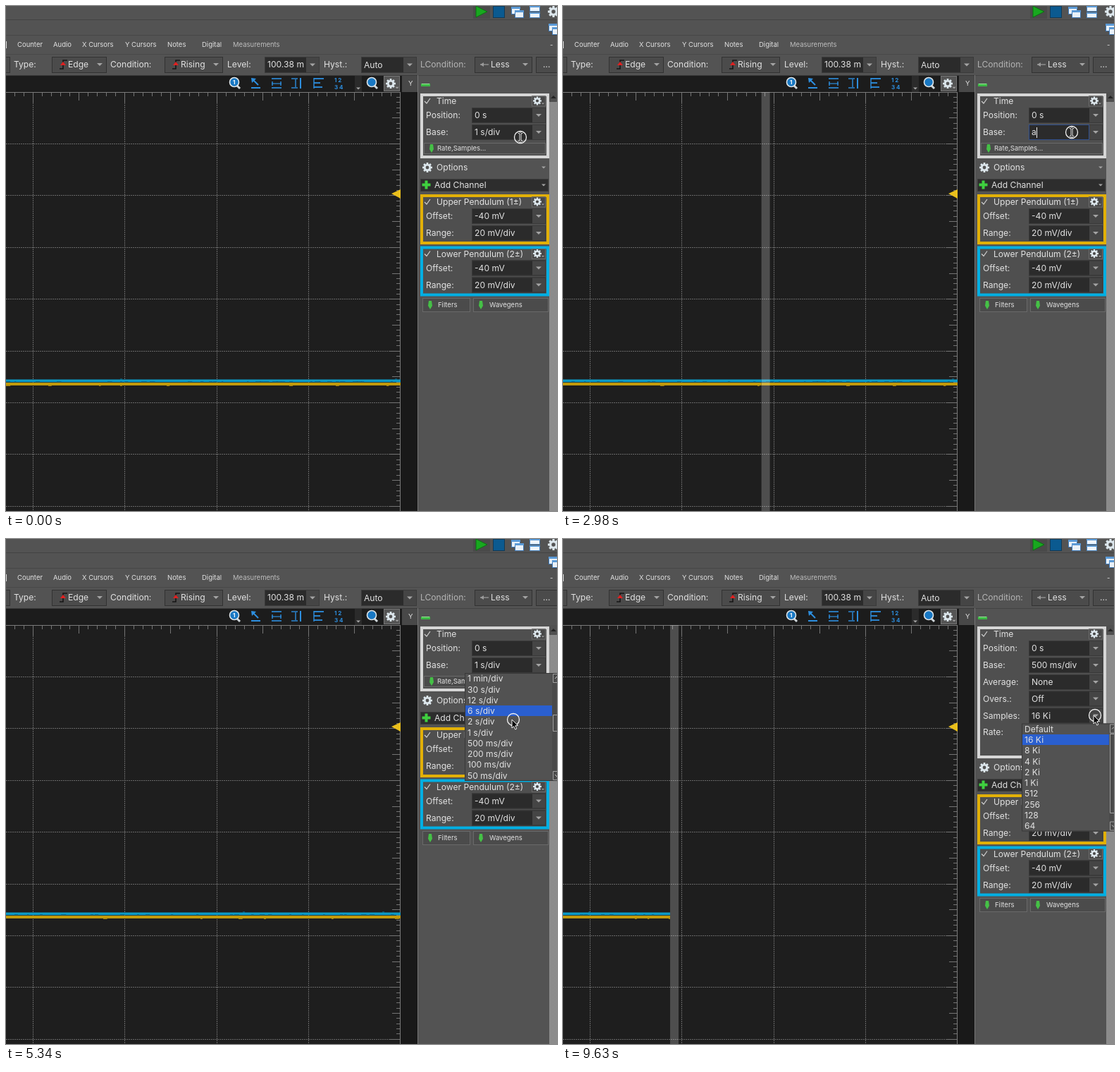
An HTML page with a canvas that plays this animation: 782 px wide and 716 px high, repeating every 9.65 s.

```html
<!DOCTYPE html>
<html lang="en">
<head>
<meta charset="utf-8">
<title>Oscilloscope time base</title>
<style>
  html, body { margin: 0; width: 100%; height: 100%; overflow: hidden; background: #535353; }
  canvas { display: block; }
</style>
</head>
<body>
<canvas id="stage" width="782" height="716"></canvas>
<script>
const ctx = document.getElementById('stage').getContext('2d');
const LOOP = 9650;
const BODY = 12.1, SMALL = 9.5;
const PLOT = { right: 559, top: 122, bottom: 716, gridX: 38, divX: 130.3, gridY: 195, divY: 73.4 };
const CHANNELS = [['Upper Pendulum (1±)', '#e2b007', 267], ['Lower Pendulum (2±)', '#00afe3', 340.5]];
const BASE_ITEMS = ['1 min/div', '30 s/div', '12 s/div', '6 s/div', '2 s/div', '1 s/div',
  '500 ms/div', '200 ms/div', '100 ms/div', '50 ms/div'];
const SAMPLE_ITEMS = ['Default', '16 Ki', '8 Ki', '4 Ki', '2 Ki', '1 Ki', '512', '256', '128', '64'];

// Moments of the interaction, in ms
const FOCUS = 420, ERASE = 2000, TYPE = 2700, UNTYPE = 3450, OPEN_BASE = 4300,
  PICK = 6220, EXPAND = 7030, OPEN_SAMPLES = 9560;

// Pointer stops: time, x, y
const PATH = [
  [0, 730, 186], [60, 730, 186], [240, 727, 181], [590, 727, 181], [1020, 756, 181], [1260, 756, 181],
  [1520, 722, 179], [3570, 722, 179], [4150, 755, 181], [4650, 755, 181], [5200, 722, 240],
  [5340, 720, 256], [5450, 720, 264], [5510, 720, 264], [5780, 717, 290], [6220, 717, 290],
  [6850, 671, 200], [7440, 671, 200], [7950, 717, 265], [8250, 709, 256], [8430, 709, 256],
  [9350, 749, 251], [9450, 755, 250], [LOOP, 755, 250]
];

const between = (t, a, b) => t >= a && t < b;

function rect(x, y, w, h, fill, stroke) {
  ctx.fillStyle = fill;
  ctx.fillRect(x, y, w, h);
  if (stroke) {
    ctx.strokeStyle = stroke;
    ctx.lineWidth = 1;
    ctx.strokeRect(x + .5, y + .5, w - 1, h - 1);
  }
}

function text(str, x, y, size = BODY, fill = '#e2e2e2', weight = 400) {
  ctx.font = `${weight} ${size}px Inter, "Open Sans", sans-serif`;
  ctx.textBaseline = 'alphabetic';
  ctx.fillStyle = fill;
  ctx.fillText(str, x, y + size * .36);
}

function poly(points, fill, stroke, width = 1) {
  ctx.beginPath();
  points.forEach(([x, y]) => ctx.lineTo(x, y));
  ctx.closePath();
  if (fill) { ctx.fillStyle = fill; ctx.fill(); }
  if (stroke) { ctx.strokeStyle = stroke; ctx.lineWidth = width; ctx.stroke(); }
}

function line(points, color, width = 1) {
  ctx.beginPath();
  points.forEach(([x, y]) => ctx.lineTo(x, y));
  ctx.strokeStyle = color;
  ctx.lineWidth = width;
  ctx.stroke();
}

function ring(x, y, r, color, width) {
  ctx.beginPath();
  ctx.arc(x, y, r, 0, Math.PI * 2);
  ctx.strokeStyle = color;
  ctx.lineWidth = width;
  ctx.stroke();
}

const caretDown = (x, y, s = 4, fill = '#a4a4a4') =>
  poly([[x - s, y - s / 2], [x + s, y - s / 2], [x, y + s / 2]], fill);

const check = (x, y) => line([[x - 4, y], [x - 1, y + 3], [x + 4, y - 4]], '#d0d0d0', 1.2);

function gear(x, y, r, color = '#dce6ec') {
  for (let i = 0; i < 8; i++) {
    const a = i * Math.PI / 4;
    line([[x + Math.cos(a) * r * .6, y + Math.sin(a) * r * .6],
      [x + Math.cos(a) * r, y + Math.sin(a) * r]], color, r * .38);
  }
  ring(x, y, r * .55, color, r * .42);
}

function gearButton(x, y) {
  rect(x, y, 20, 15, '#484848', '#6a6a6a');
  gear(x + 8, y + 7, 6);
  caretDown(x + 16, y + 11, 2);
}

function greenArrow(x, y, up) {
  const d = up ? -1 : 1;
  poly([[x - 2, y - 6 * d], [x + 2, y - 6 * d], [x + 3, y + 1 * d], [x, y + 6 * d], [x - 3, y + 1 * d]],
    up ? '#4fd04f' : '#45c046');
}

function field(x, y, w, h, value, focused) {
  rect(x, y, w, h, '#2b2b2b', '#3a3a3a');
  rect(x + w - 19, y + 1, 18, h - 2, '#454545');
  caretDown(x + w - 10, y + h / 2);
  if (focused) {
    ctx.strokeStyle = '#31508f';
    ctx.strokeRect(x + .5, y + .5, w - 20, h - 1);
  }
  text(value, x + 4, y + h / 2);
}

function combo(x, w, label) {
  rect(x, 72, w, 23, '#4b4b4b', '#323232');
  text(label, x + 23, 83);
  caretDown(x + w - 10, 83);
}

function edgeIcon(x) {
  line([[x, 89], [x + 5, 89], [x + 5, 77], [x + 11, 77]], '#161616', 1.6);
  poly([[x + 1, 84], [x + 9, 84], [x + 5, 79]], '#e02020');
}

function drawWindows(x, y) {
  for (const d of [0, 5]) {
    rect(x + d, y + d, 13, 11, '#e9f1f8', '#3f78b5');
    rect(x + d, y + d, 13, 3, '#5b9ad6');
  }
}

function drawTopBars() {
  rect(0, 0, 782, 98, '#535353');
  rect(0, 19, 782, 1, '#434343');
  rect(0, 41, 782, 1, '#474747');
  rect(663, 0, 24, 18, '#4a4a4a');
  poly([[667, 0], [683, 8], [667, 16]], '#18a81f', '#0b6f12');
  rect(691, 0, 17, 17, '#0b5a90', '#123a56');
  drawWindows(717, 1);
  for (const y of [0, 9]) {
    rect(743, y, 15, 8, '#eef4f9', '#4b84bd');
    rect(743, y, 15, 2, '#5b9ad6');
  }
  gear(777, 8, 8);
  drawWindows(770, 25);

  rect(0, 50, 1, 10, '#dadada');
  [['Counter', 16], ['Audio', 67], ['X Cursors', 108], ['Y Cursors', 169], ['Notes', 229], ['Digital', 278]]
    .forEach(([label, x]) => text(label, x, 55, SMALL));
  text('Measurements', 322, 55, SMALL, '#bdbdbd');
  text('-', 772, 55, SMALL);

  rect(0, 68, 782, 1, '#484848');
  rect(-8, 72, 14, 23, '#4b4b4b', '#323232');
  text('Type:', 11, 83);
  combo(65, 78, 'Edge');
  edgeIcon(76);
  text('Condition:', 148, 83);
  combo(225, 83, 'Rising');
  edgeIcon(236);
  text('Level:', 314, 83);
  field(367, 72, 78, 23, '');
  text('100.38 m', 371, 83);
  text('Hyst.:', 451, 83);
  field(504, 72, 79, 23, 'Auto');
  text('LCondition:', 588, 83, BODY, '#b4b4b4');
  combo(665, 82, 'Less');
  line([[673, 83], [685, 83]], '#9a9a9a', 1.3);
  poly([[673, 83], [678, 80], [678, 86]], '#9a9a9a');
  rect(752, 72, 32, 23, '#4b4b4b', '#323232');
  text('...', 762, 83);
}

function magnifier(x) {
  line([[x + 4, 113], [x + 8, 117]], '#cfd6da', 3);
  ctx.beginPath();
  ctx.arc(x, 108, 6, 0, 7);
  ctx.fillStyle = '#1878c4';
  ctx.fill();
  ring(x, 108, 6.5, '#dfe8ee', 1.6);
}

function drawPlotTools() {
  const blue = '#2d8fe0';
  rect(0, 98, 584, 24, '#1c1c1c');
  rect(0, 98, 584, 1, '#3a3a3a');
  magnifier(324);
  text('1', 322, 108, 8, '#fff', 700);
  line([[351, 105], [358, 112]], blue, 2);
  poly([[348, 102], [355, 103], [349, 109]], blue);
  line([[348, 116], [361, 116]], blue, 2);
  for (const y of [103, 116]) line([[377, y], [391, y]], blue, 1.6);
  line([[377, 110], [391, 110]], blue, 1.2);
  for (const x of [378, 390]) line([[x, 107], [x, 113]], blue, 1.4);
  for (const y of [103, 116]) line([[405, y], [414, y]], blue, 1.4);
  line([[411, 104], [411, 115]], blue, 1.4);
  line([[418, 102], [418, 117]], blue, 2);
  [[103, 14], [109, 9], [115, 12]].forEach(([y, w]) => line([[437, y], [437 + w, y]], blue, 1.8));
  line([[437, 102], [437, 117]], blue, 1.4);
  text('1 2', 466, 105, 8, blue, 700);
  text('3 4', 466, 115, 8, blue, 700);
  rect(495, 99, 10, 23, '#2b2b2b');
  caretDown(500, 117, 3);
  magnifier(519);
  rect(536, 99, 23, 22, '#555', '#777');
  gear(546, 110, 7);
  caretDown(555, 116, 2.5);
  rect(562, 99, 23, 23, '#484848');
  text('Y', 571, 110, SMALL);
}

function drawGrid() {
  const { right, top, bottom, gridX, divX, gridY, divY } = PLOT;
  rect(0, top, 584, bottom - top, '#191919');
  rect(0, top, right, bottom - top, '#1e1e1e');
  ctx.setLineDash([2, 1]);
  for (let x = gridX; x < right - 5; x += divX)
    line([[Math.round(x) + .5, top], [Math.round(x) + .5, bottom]], '#686868');
  for (let y = gridY; y < bottom; y += divY)
    line([[0, Math.round(y) + .5], [right, Math.round(y) + .5]], '#686868');
  ctx.setLineDash([]);
  const tick = i => i % 5 ? 5 : i % 10 ? 11 : 14;
  for (let i = -2; i < 41; i++) {
    const x = Math.round(gridX + i * divX / 10) + .5;
    line([[x, top + 1], [x, top + 1 + tick(i)]], '#747474');
  }
  for (let i = -9; i < 71; i++) {
    const y = Math.round(gridY + i * divY / 10) + .5;
    line([[right, y], [right - tick(i), y]], '#747474');
  }
  line([[0, top + .5], [right, top + .5]], '#7a7a7a');
  line([[right + .5, top], [right + .5, bottom]], '#7a7a7a');
}

const noise = n => { const s = Math.sin(n * 12.9898) * 43758.5453; return s - Math.floor(s); };

function drawTrace(from, to, seed) {
  if (to <= from) return;
  ctx.save();
  ctx.beginPath();
  ctx.rect(from, 520, to - from, 25);
  ctx.clip();
  rect(0, 529.5, 560, 3.8, '#0a9ac6');
  rect(0, 534, 560, 4, '#c29a0b');
  for (let i = 0; i < 94; i++) {
    const n = i + seed * 131, x = i * 6, len = 2 + noise(n + .3) * 6;
    if (noise(n) < .3) rect(x, 532.5, len, 1, '#14566a');
    if (noise(n + .7) < .1) rect(x, 538, len, 1, '#9a7b10');
    if (noise(n + .5) < .03) rect(x, 528.5, 3, 1, '#0a7fa3');
  }
  ctx.restore();
}

function drawSignal(t) {
  const fresh = t >= PICK;
  const head = fresh ? (t - 9070) * .271 : (t - 915) * .1363;
  const end = Math.max(0, Math.min(560, head));
  drawTrace(0, end, fresh ? 2 : 1);
  if (!fresh) drawTrace(end, 560, 0);
  const left = Math.max(0, head), right = Math.min(560, head + 12);
  if (right > left) rect(left, PLOT.top, right - left, PLOT.bottom - PLOT.top, 'rgba(255,255,255,.21)');
  poly([[547, 266], [560, 260], [560, 273]], '#e9bf1c');
}

function group(y, h, color, title) {
  rect(588, y, 183, h, color);
  rect(592, y + 4, 175, h - 8, '#4f4f4f');
  check(598, y + 11);
  text(title, 611, y + 11);
  gearButton(746, y + 3.5);
}

function row(label, value, y, focused) {
  text(label, 596, y);
  field(661, y - 11, 105, 22, value, focused);
}

function button(label, x, y, w, h) {
  rect(x, y, w, h, '#4b4b4b', '#6a6a6a');
  greenArrow(x + 11, y + h / 2);
}

function baseValue(t) {
  if (t >= PICK) return '500 ms/div';
  if (t < ERASE || t >= OPEN_BASE) return '1 s/div';
  if (between(t, TYPE, UNTYPE)) return 'a';
  return '1 s/div'.slice(0, Math.max(0, 6 - Math.floor((t - ERASE) / 75)));
}

function drawBase(t) {
  const value = baseValue(t);
  row('Base:', value, 179, between(t, FOCUS, OPEN_BASE) || between(t, PICK, EXPAND));
  const blinkOn = (t + 1400) % 1050 < 525;
  if (between(t, 590, OPEN_BASE) && (blinkOn || between(t, ERASE, 2500)))
    rect(Math.round(665 + ctx.measureText(value).width), 172, 1, 15, '#f0f0f0');
}

function drawScrollbar() {
  rect(771, 122, 11, 594, '#6d6d6d');
  ctx.fillStyle = '#aaa';
  for (let y = 136; y < 716; y++)
    for (let x = 771 + y % 2; x < 782; x += 2) ctx.fillRect(x, y, 1, 1);
  rect(771, 122, 11, 14, '#505050');
  poly([[773, 131], [781, 131], [777, 127]], '#242424');
}

function drawPanel(t) {
  const open = t >= EXPAND, dy = open ? 95 : 0;
  rect(584, 98, 198, 618, '#535353');
  rect(584, 98, 1, 618, '#757575');
  rect(585, 98, 197, 1, '#444');
  rect(589, 110, 13, 4, '#3dba45');
  rect(590, 110, 11, 1, '#9be89a');
  drawScrollbar();

  group(124, 92 + dy, '#d6d6d6', 'Time');
  row('Position:', '0 s', 155);
  drawBase(t);
  if (open) {
    row('Average:', 'None', 203);
    row('Overs.:', 'Off', 226.5);
    row('Samples:', '16 Ki', 250.5);
    row('Rate:', '3.2 kHz', 274);
    greenArrow(679, 296, true);
  } else {
    button('', 593, 194, 173, 16);
    text('Rate,Samples...', 612, 202, SMALL);
  }

  ctx.save();
  ctx.translate(0, dy);
  gear(598, 229, 7);
  text('Options', 611, 229);
  caretDown(763, 229, 3);
  rect(588, 245, 182, 18, '#2d2d2d', '#3c3c3c');
  rect(594.5, 247.5, 4, 12, '#3fd03f');
  rect(590.5, 251.5, 12, 4, '#3fd03f');
  text('Add Channel', 608, 254);
  caretDown(763, 254, 3);
  for (const [name, color, y] of CHANNELS) {
    group(y, 71, color, name);
    row('Offset:', '-40 mV', y + 31);
    row('Range:', '20 mV/div', y + 55);
  }
  button('', 591, 414, 68, 20);
  text('Filters', 613, 424, SMALL);
  button('', 663, 414, 107, 20);
  text('Wavegens', 686, 424, SMALL);
  ctx.restore();
}

function drawList(items, y, selected, thumbTop, thumbBottom) {
  rect(651, y, 131, 153, '#525252', '#383838');
  items.forEach((item, i) => {
    const mid = y + 8 + i * 15.25;
    if (i === selected) rect(652, Math.round(mid - 7.5), 123, 15, '#2a5fcf');
    text(item, 655, mid);
  });
  rect(775, y + 1, 7, 151, '#4a4a4a');
  for (const [a, b] of [[y + 1, y + 13], [thumbTop, thumbBottom], [y + 139, y + 151]])
    line([[783, a + .5], [776.5, a + .5], [776.5, b + .5], [783, b + .5]], '#a2a2a2');
  line([[779, y + 8], [782, y + 5]], '#c8c8c8');
  line([[779, y + 144], [782, y + 147]], '#c8c8c8');
}

function pointerAt(t) {
  const i = Math.max(1, PATH.findIndex(stop => stop[0] > t));
  const [t0, x0, y0] = PATH[i - 1], [t1, x1, y1] = PATH[i];
  const u = (t - t0) / (t1 - t0), s = u * u * (3 - 2 * u);
  return [x0 + (x1 - x0) * s, y0 + (y1 - y0) * s];
}

function drawLists(t) {
  if (between(t, OPEN_BASE, PICK)) {
    const hovered = Math.floor((pointerAt(t - 100)[1] - 190.5) / 15.25);
    drawList(BASE_ITEMS, 190, hovered < 0 ? 5 : hovered, 249, 272);
  }
  if (t >= OPEN_SAMPLES) drawList(SAMPLE_ITEMS, 261.5, 1, 276, 388);
}

function drawPointer(t) {
  const [x, y] = pointerAt(t);
  const beam = t < 800 || between(t, 1400, 3850) || between(t, 7650, 9100);
  ring(x, y, 8.5, '#f2f2f2', 1.3);
  if (beam) {
    for (const [color, width] of [['#f4f4f4', 3], ['#111', 1.1]]) {
      line([[x, y - 6], [x, y + 6]], color, width);
      for (const d of [-1, 1]) line([[x - 3, y + 7 * d], [x, y + 5.5 * d], [x + 3, y + 7 * d]], color, width);
    }
  } else {
    const shape = [[0, 0], [0, 12], [2.7, 9.6], [4.8, 14], [6.8, 13], [4.8, 8.8], [8.5, 8.5]];
    poly(shape.map(([dx, dy]) => [x - 2 + dx, y + dy]), '#050505', '#f4f4f4', 1);
  }
}

function draw(now) {
  const t = now % LOOP;
  drawTopBars();
  drawGrid();
  drawPlotTools();
  drawSignal(t);
  drawPanel(t);
  drawLists(t);
  drawPointer(t);
  requestAnimationFrame(draw);
}
requestAnimationFrame(draw);
</script>
</body>
</html>
```
